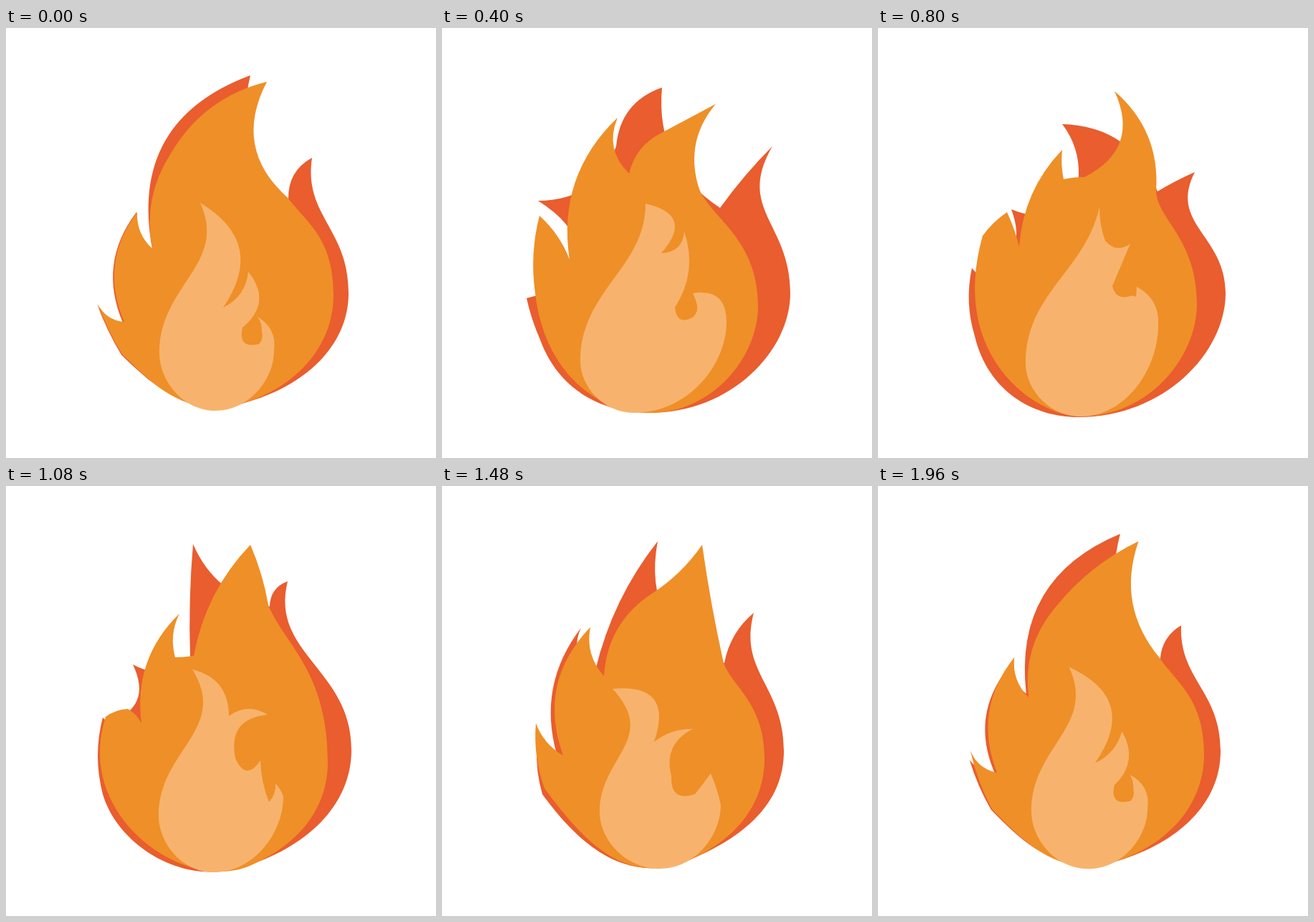
Recreate the animation shown at these times as an HTML page with a canvas. Size 600 by 600 pixels, loop 2000 ms.

```html
<!DOCTYPE html>
<html lang="en">
<head>
<meta charset="utf-8">
<title>Flame</title>
<style>
html, body { margin: 0; width: 100%; height: 100%; overflow: hidden; background: #fff; }
canvas { display: block; width: 600px; height: 600px; }
</style>
</head>
<body>
<canvas id="stage" width="600" height="600"></canvas>
<script>
const ctx = document.getElementById('stage').getContext('2d');
const LOOP = 2000, STEP = 40;
const TIMES = [0, 400, 800, 1080, 1480, 1800, LOOP];

// One row per pose: corner points clockwise from the tip.
const backPoints = [
  [341, 66, 394, 238, 427, 181, 478, 370, 333, 523, 161, 456, 127, 385, 163, 411, 182, 257, 204, 308],
  [307, 83, 388, 251, 461, 165, 486, 370, 290, 537, 137, 435, 118, 377, 133, 373, 134, 241, 243, 165],
  [257, 134, 390, 228, 442, 201, 485, 370, 280, 543, 135, 430, 131, 335, 140, 345, 186, 253, 280, 207],
  [261, 81, 368, 168, 393, 133, 482, 368, 330, 532, 135, 430, 135, 323, 142, 330, 177, 249, 257, 238],
  [301, 77, 394, 247, 435, 177, 477, 370, 345, 522, 140, 430, 132, 365, 160, 374, 194, 198, 214, 257],
  [326, 70, 393, 254, 407, 249, 478, 370, 345, 522, 144, 434, 130, 370, 160, 353, 180, 239, 218, 215]
];
// One bend per edge.
const backBends = [
  [-30, 30, -12, 23, 46, 5, -28, 29, -23, 42],
  [-30, 4, -51, 0, 25, 5, 0, -80, -35, 32],
  [33, 3, -37, 0, 18, 13, 0, -54, -56, -18],
  [-26, 34, -25, 27, 20, 13, 0, -57, -38, 3],
  [-41, 18, -22, 32, 45, 8, -20, 25, -47, 11],
  [-42, 10, 33, 32, 45, 8, -15, 32, 0, 20]
];

const middlePoints = [
  [364, 75, 394, 238, 457, 372, 333, 523, 162, 455, 128, 385, 165, 410, 183, 257, 204, 308, 230, 175],
  [382, 106, 358, 222, 441, 388, 290, 537, 130, 370, 136, 262, 178, 323, 245, 125, 261, 203, 305, 147],
  [330, 88, 388, 228, 445, 385, 283, 542, 146, 290, 180, 257, 197, 305, 257, 170, 259, 211, 288, 208],
  [341, 82, 366, 166, 449, 385, 340, 530, 139, 322, 170, 311, 189, 331, 242, 178, 236, 239, 262, 237],
  [363, 82, 393, 247, 450, 380, 345, 522, 143, 422, 131, 331, 169, 376, 207, 197, 226, 265, 293, 150],
  [362, 85, 391, 250, 447, 382, 345, 522, 146, 432, 132, 306, 170, 360, 219, 167, 235, 243, 310, 155]
];
const middleBends = [
  [-39, 26, 23, 46, 5, -28, 29, -23, 20, 21],
  [-27, 14, 0, 13, 10, 12, 26, -34, 23, 0],
  [25, 2, 0, -48, 9, 5, 18, -8, 6, -48],
  [6, 22, 27, -45, 15, 15, 25, -19, -3, 15],
  [-2, 12, 27, 50, 11, -18, 31, -25, 25, -10],
  [14, 9, 27, 50, 14, -20, 27, -28, 28, -27]
];

const frontPoints = [
  [271, 244, 303, 390, 338, 340, 330, 418, 353, 441, 357, 424, 351, 403, 374, 450, 292, 534, 214, 453],
  [284, 245, 306, 314, 338, 284, 325, 390, 351, 403, 355, 383, 350, 370, 397, 410, 268, 537, 193, 465],
  [309, 250, 317, 297, 352, 301, 327, 360, 352, 374, 360, 375, 361, 361, 391, 415, 283, 542, 206, 468],
  [260, 256, 311, 321, 365, 319, 320, 380, 355, 383, 367, 441, 376, 415, 387, 433, 290, 539, 213, 460],
  [238, 283, 296, 357, 350, 339, 320, 405, 353, 430, 363, 417, 375, 401, 389, 445, 304, 534, 220, 455],
  [248, 287, 302, 373, 350, 351, 328, 417, 350, 434, 354, 420, 354, 403, 385, 447, 298, 535, 214, 457]
];
const frontBends = [
  [53, -28, 49, -80, -28, -18, 33, 0, 0, 39],
  [84, -45, 24, -77, -30, -5, 58, 0, 0, 0],
  [-9, -45, 0, -54, 20, 0, 32, 0, 0, -20],
  [39, 33, -55, -90, -9, -22, 10, 0, 0, 52],
  [77, 18, -40, -72, 0, 0, 5, 0, 0, 65],
  [88, -3, 0, -80, -15, 0, 41, 0, 0, 40]
];

// Edge kinds: a = arc, s = side, q = quarter, b = base, c = corner, f = flank.
const layers = [
  { color: '#e95d2e', points: backPoints, bends: backBends, kinds: 'aasqbaaaaa', side: [.43, .52], lift: 0 },
  { color: '#ef8f27', points: middlePoints, bends: middleBends, kinds: 'asqbaaaaaa', side: [.25, .42], lift: 53 },
  { color: '#f7b36d', points: frontPoints, bends: frontBends, kinds: 'aaaaaaaqcf', lift: 0 }
];

function blend(poses, t) {
  let i = 0;
  while (t >= TIMES[i + 1]) i++;
  const k = (t - TIMES[i]) / (TIMES[i + 1] - TIMES[i]);
  const next = poses[(i + 1) % poses.length];
  return poses[i].map((v, j) => v + (next[j] - v) * k);
}

function fillShape(p, bends, { kinds, side, color }) {
  let slope = 0;
  ctx.beginPath();
  ctx.moveTo(p[0], p[1]);
  bends.forEach((bend, i) => {
    const j = (i + 1) % bends.length * 2;
    const x0 = p[i * 2], y0 = p[i * 2 + 1], x = p[j], y = p[j + 1];
    const dx = x - x0, dy = y - y0;
    const curve = (ax, ay, bx, by) => ctx.bezierCurveTo(ax, ay, bx, by, x, y);
    switch (kinds[i]) {
      case 'a':
        ctx.quadraticCurveTo(x0 + dx / 2 + dy * bend / 100, y0 + dy / 2 - dx * bend / 100, x, y);
        break;
      case 's':
        curve(x0 + bend, y0 + dy * side[0], x, y0 + dy * side[1]);
        break;
      case 'q':
        slope = bend / (.58 * dx);
        curve(x0, y0 + dy * .48, x - dx * .58, y - bend);
        break;
      case 'b':
        curve(x0 + dx * .45, y0 + dx * .45 * slope, x + bend, y - dy * .67);
        break;
      case 'c':
        curve(x0 + dx * .58, y0, x, y - dy * .48);
        break;
      case 'f':
        curve(x0, y0 + dy * .45, x + bend, y - dy * .41);
    }
  });
  ctx.closePath();
  ctx.fillStyle = color;
  ctx.fill();
}

function draw(t) {
  ctx.fillStyle = '#fff';
  ctx.fillRect(0, 0, 600, 600);
  for (const layer of layers) {
    const p = blend(layer.points, t);
    // The tip leaps up and falls back early in the loop.
    p[1] -= layer.lift * Math.max(0, 1 - Math.abs(t - 200) / 200);
    fillShape(p, blend(layer.bends, t), layer);
  }
}

const start = performance.now();
function tick() {
  const t = (performance.now() - start) % LOOP;
  draw(Math.floor(t / STEP) * STEP);
  requestAnimationFrame(tick);
}
tick();
</script>
</body>
</html>
```
